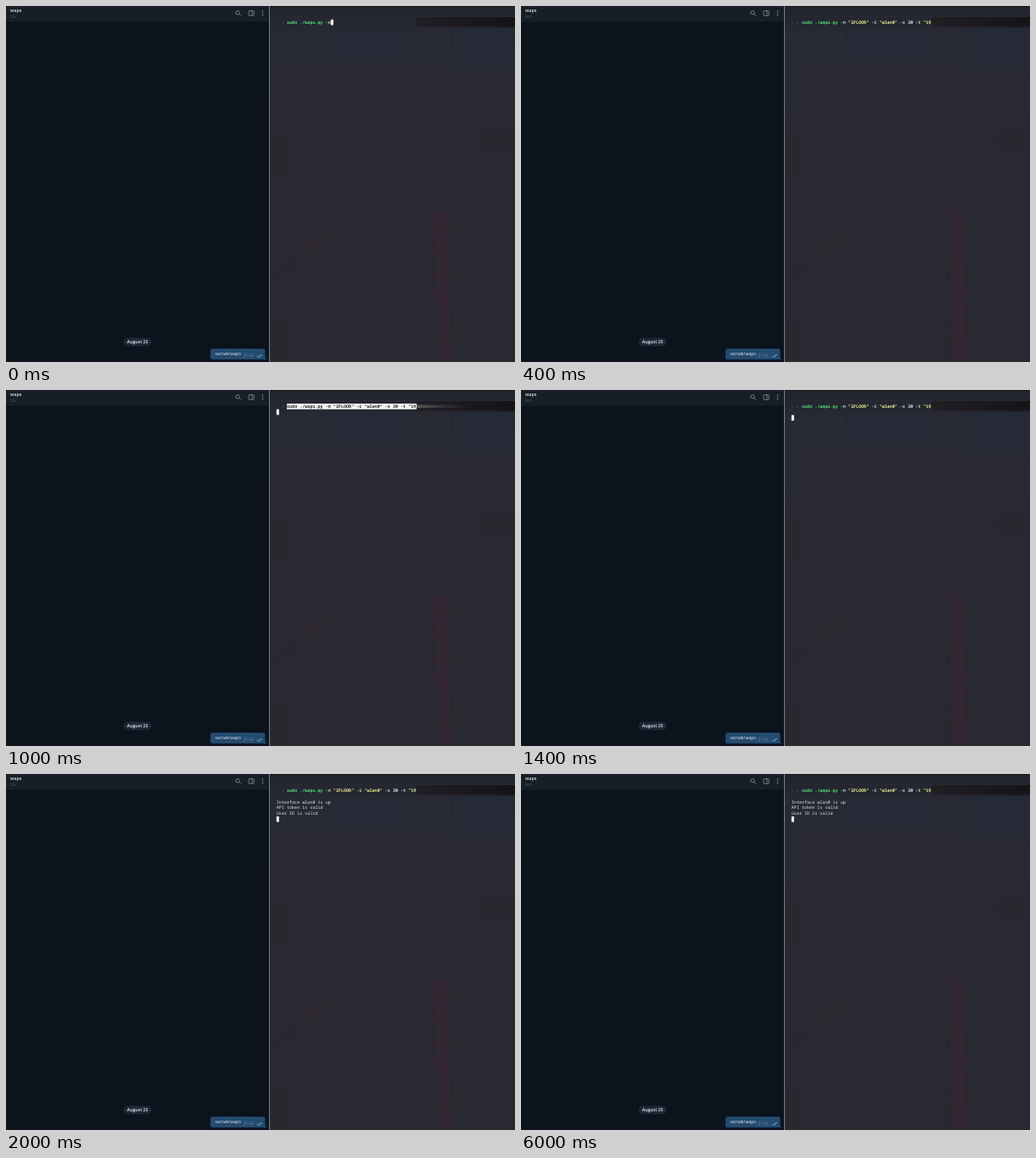
These frames come from a looping animation (600x419 px, 8 s). An HTML page:

```html
<!DOCTYPE html>
<html lang="en">
<head>
<meta charset="utf-8">
<title>Bot chat and terminal</title>
<style>
html, body { margin: 0; width: 100%; height: 100%; overflow: hidden; background: #0c131d; }
svg { display: block; width: 100%; height: 100%; }
text { font-family: "Open Sans", sans-serif; text-rendering: geometricPrecision; white-space: pre; }
.term text { font-family: "Noto Sans Mono", "DejaVu Sans Mono", monospace; font-size: 5.08px; font-weight: 500; fill: #e6e6e4; }
.term .command { font-weight: 700; }
.icon { fill: none; stroke: #7b8591; stroke-width: .9; }
</style>
</head>
<body>
<svg viewBox="0 0 600 419">
  <defs>
    <linearGradient id="wall" x2="0" y2="1">
      <stop offset="0" stop-color="#22242d"/>
      <stop offset=".08" stop-color="#282a34"/>
      <stop offset=".4" stop-color="#2a2932"/>
      <stop offset="1" stop-color="#292932"/>
    </linearGradient>
    <linearGradient id="veil">
      <stop offset="0" stop-color="#211f23"/>
      <stop offset=".5" stop-color="#1b191e"/>
      <stop offset="1" stop-color="#141318"/>
    </linearGradient>
    <linearGradient id="glow">
      <stop offset="0" stop-color="#8b8785" stop-opacity=".55"/>
      <stop offset="1" stop-color="#5a5150" stop-opacity="0"/>
    </linearGradient>
    <filter id="soft" x="-50%" y="-50%" width="200%" height="200%"><feGaussianBlur stdDeviation="1.6"/></filter>
    <filter id="edge" x="-10%" y="-50%" width="120%" height="200%"><feGaussianBlur stdDeviation=".7"/></filter>
    <clipPath id="pane"><rect x="311" width="289" height="419"/></clipPath>
  </defs>

  <!-- chat -->
  <rect width="310" height="419" fill="#0c131d"/>
  <rect width="310" height="18.5" fill="#171e28"/>
  <text x="5" y="6.7" font-size="5.3" font-weight="600" fill="#e4e8ec">waps</text>
  <text x="5" y="14.4" font-size="5" fill="#4c5865">bot</text>
  <g class="icon">
    <circle cx="273" cy="7.8" r="2.2"/>
    <path d="M274.7 9.5 277 11.7"/>
    <rect x="286" y="5.7" width="6.3" height="5.6" rx=".6"/>
    <path d="M290 5.7v5.6"/>
  </g>
  <g fill="#87919c">
    <circle cx="302.5" cy="6" r=".75"/><circle cx="302.5" cy="8.5" r=".75"/><circle cx="302.5" cy="11" r=".75"/>
  </g>
  <rect x="138.7" y="390.5" width="32.8" height="9.7" rx="4.85" fill="#1c2937"/>
  <text x="155.1" y="397.2" font-size="5.2" font-weight="600" fill="#eef2f5" text-anchor="middle">August 25</text>
  <path d="M243.5 403.2H303q2.5 0 2.5 2.5v7.3q.3 2.2 2.3 2.9H243.5q-2.5 0-2.5-2.5v-7.7q0-2.5 2.5-2.5Z" fill="#244b70"/>
  <text x="246.4" y="411.3" font-size="5.15" fill="#e8eef4">sarnek/waps</text>
  <text x="279.4" y="413.4" font-size="4.9" fill="#6b97bf">21:25</text>
  <path d="M295.7 411.8l1.6 1.7 3-3.6M298.6 413.1l.4.4 3-3.6" fill="none" stroke="#6faee0" stroke-width=".8"/>

  <!-- terminal -->
  <g clip-path="url(#pane)">
    <rect x="310" width="290" height="419" fill="url(#wall)"/>
    <g filter="url(#soft)">
      <path d="M384 25h94v42h-94zM528 27h72v50h-72z" fill="#262c38" opacity=".5"/>
      <path d="M505 243h17l3 176h-18z" fill="#35232f" opacity=".65"/>
      <path d="M312 324 378 265v8L322 316Z" fill="#38242f" opacity=".6"/>
      <path d="M318 148h11v56h-11zM317 373h13v46h-13z" fill="#30262f" opacity=".6"/>
      <path d="M560 150h36v14h-36z" fill="#24252e" opacity=".6"/>
    </g>
    <path d="M311 .5H600" stroke="#15171d"/>
    <path d="M311 12.4H600" stroke="#30323b" stroke-width=".7" opacity=".6"/>
    <rect x="484" y="13" width="120" height="11.6" fill="url(#veil)" filter="url(#edge)"/>
  </g>
  <path d="M310.5 0V419" stroke="#71818c" stroke-width="1"/>
  <g class="term">
    <rect id="glowBar" x="484" y="17.5" width="64" height="3.6" fill="url(#glow)"/>
    <rect id="mark" x="331" y="16" width="153" height="6.7" fill="#f4f4f2"/>
    <text x="318.8" y="21" fill="#43647d" style="fill:#43647d">~</text>
    <text x="324.9" y="21" style="fill:#7d9873">›</text>
    <text id="command" class="command" x="331" y="21"></text>
    <g id="output"></g>
    <rect id="cursor" width="3.1" height="6.6" fill="#f2f2f0"/>
  </g>
</svg>
<script>
const LOOP = 8000, LEFT = 318.8, CELL = 3.05, ROW = 6.8;
const $ = id => document.getElementById(id);
const GREEN = "#4fe07a", FLAG = "#c3e2d3", TEXT = "#ecece4", STRING = "#e9ee91";
const words = [
  ["sudo ./waps.py ", GREEN], ["-n ", FLAG], ['"2FLOOR" ', STRING],
  ["-i ", FLAG], ['"wlan0" ', STRING], ["-s ", FLAG], ["30 ", TEXT],
  ["-t ", FLAG], ['"19', STRING]
];
const lines = ["Interface wlan0 is up", "API token is valid", "User ID is valid"];

// cursor: [column, row], or null while it is under the blurred strip
const states = [
  { at: 0, typed: 17, cursor: [21, 0] },
  { at: 200, typed: 33, cursor: [37, 0] },
  { at: 400, typed: 50, cursor: null },
  { at: 600, typed: 50, marked: true, cursor: [0, 1] },
  { at: 1400, typed: 50, cursor: [0, 2] },
  { at: 1600, typed: 50, shown: 2, cursor: [0, 4] },
  { at: 2000, typed: 50, shown: 3, cursor: [0, 5] }
];

function addText(parent, tag, content, attrs = {}) {
  const el = document.createElementNS("http://www.w3.org/2000/svg", tag);
  el.textContent = content;
  for (const key in attrs) el.setAttribute(key, attrs[key]);
  return parent.appendChild(el);
}

const spans = words.map(() => addText($("command"), "tspan", ""));
const rows = lines.map((line, i) =>
  addText($("output"), "text", line, { x: LEFT, y: 21 + ROW * (i + 2) }));
const show = (el, on) => el.setAttribute("visibility", on ? "visible" : "hidden");

function draw(state) {
  let left = state.typed;
  words.forEach(([word, color], i) => {
    spans[i].textContent = word.slice(0, Math.max(0, left));
    spans[i].style.fill = state.marked ? "#25262d" : color;
    left -= word.length;
  });
  rows.forEach((row, i) => show(row, i < (state.shown || 0)));
  show($("mark"), state.marked);
  show($("glowBar"), state.marked);
  show($("cursor"), state.cursor);
  if (state.cursor) {
    const [col, row] = state.cursor;
    $("cursor").setAttribute("x", LEFT + col * CELL);
    $("cursor").setAttribute("y", 15.9 + row * ROW);
  }
}

let current, start;
function tick(now) {
  start ??= now;
  const t = (now - start) % LOOP;
  const next = states.findLast(s => s.at <= t);
  if (next !== current) draw(current = next);
  requestAnimationFrame(tick);
}
draw(states[0]);
requestAnimationFrame(tick);
</script>
</body>
</html>
```
